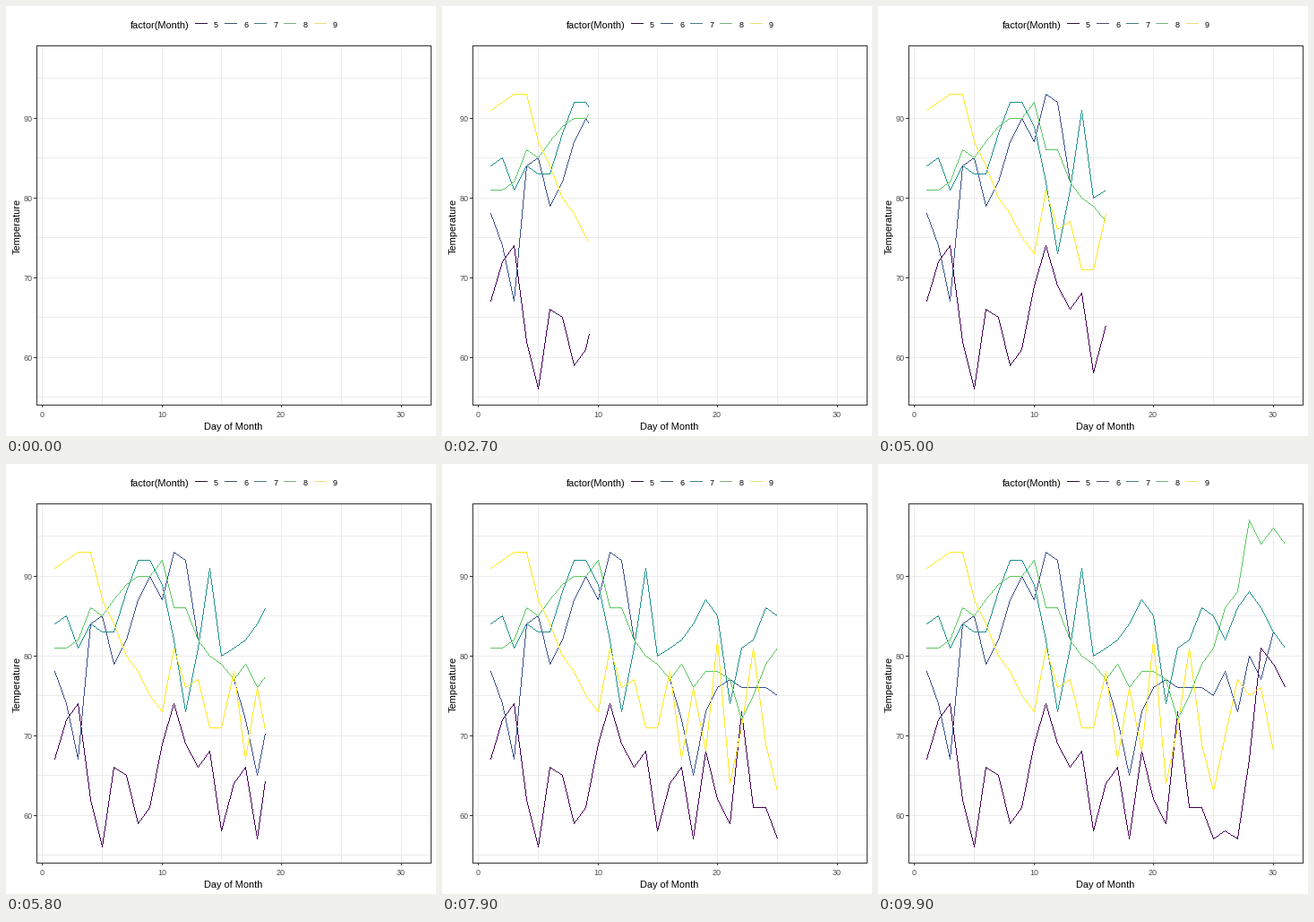
Write a matplotlib script that moves like this. It is 480x480 px and loops after 10 s.

```python
import numpy as np
import matplotlib.pyplot as plt
from matplotlib.animation import FuncAnimation
from matplotlib.colors import to_rgb

SIZE, FRAMES, INTERVAL = 480, 100, 100
LEFT, TOP, RIGHT, BOTTOM = 34, 44, 474, 445
plt.rcParams["font.family"] = "Liberation Sans"

MAY = [67, 72, 74, 62, 56, 66, 65, 59, 61, 69, 74, 69, 66, 68, 58, 64,
       66, 57, 68, 62, 59, 73, 61, 61, 57, 58, 57, 67, 81, 79, 76]
JUNE = [78, 74, 67, 84, 85, 79, 82, 87, 90, 87, 93, 92, 82, 80, 79,
        77, 72, 65, 73, 76, 77, 76, 76, 76, 75, 78, 73, 80, 77, 83]
JULY = [84, 85, 81, 84, 83, 83, 88, 92, 92, 89, 82, 73, 81, 91, 80, 81,
        82, 84, 87, 85, 74, 81, 82, 86, 85, 82, 86, 88, 86, 83, 81]
AUGUST = [81, 81, 82, 86, 85, 87, 89, 90, 90, 92, 86, 86, 82, 80, 79, 77,
          79, 76, 78, 78, 77, 72, 75, 79, 81, 86, 88, 97, 94, 96, 94]
SEPTEMBER = [91, 92, 93, 93, 87, 84, 80, 78, 75, 73, 81, 76, 77, 71, 71,
             78, 67, 76, 68, 82, 64, 71, 81, 69, 63, 70, 77, 75, 76, 68]
SERIES = [MAY, JUNE, JULY, AUGUST, SEPTEMBER]
COLORS = ["#440154", "#3B528B", "#21908C", "#5DC863", "#FDE725"]

DAYS = np.arange(1, 32)
# Each day is reached on a whole frame; the pen moves linearly in between.
ARRIVAL = np.round((DAYS - 1) * (FRAMES - 1) / 30)


def px(day):
    return 40.8 + 13.343 * day


def py(temp):
    return 125.1 + (90 - temp) * 8.9


def stroke(img, xs, ys, color):
    """One-pixel polyline without antialiasing; the final pixel stays open."""
    xs, ys = np.floor(xs).astype(int), np.floor(ys).astype(int)
    rgb = to_rgb(color)
    for x0, y0, x1, y1 in zip(xs, ys, xs[1:], ys[1:]):
        n = max(abs(x1 - x0), abs(y1 - y0))
        if n:
            t = np.arange(n) / n
            col = np.floor(x0 + (x1 - x0) * t + 0.5).astype(int)
            row = np.floor(y0 + (y1 - y0) * t + 0.5).astype(int)
            img[row, col] = rgb


def muted(color, amount=0.5):
    rgb = np.array(to_rgb(color))
    gray = rgb @ [0.299, 0.587, 0.114]
    return rgb + (gray - rgb) * amount


def make_background():
    img = np.ones((SIZE, SIZE, 3))
    for temp in range(55, 100, 5):
        img[int(py(temp)), LEFT:RIGHT] = to_rgb("#EBEBEB")
    for day in range(0, 35, 5):
        if day <= 30:
            img[TOP:BOTTOM, int(px(day))] = to_rgb("#EBEBEB")
    dark = to_rgb("#333333")
    img[[TOP, BOTTOM], LEFT:RIGHT + 1] = dark
    img[TOP:BOTTOM + 1, [LEFT, RIGHT]] = dark
    for temp in range(60, 100, 10):
        img[int(py(temp)), LEFT - 3:LEFT] = dark
    for day in range(0, 40, 10):
        img[BOTTOM:BOTTOM + 3, int(px(day))] = dark
    for i, color in enumerate(COLORS):
        x = int(211 + 33.3 * i)
        img[19, x:x + 14] = muted(color)
    return img


fig = plt.figure(figsize=(SIZE / 72, SIZE / 72), dpi=72, facecolor="white")
ax = fig.add_axes([0, 0, 1, 1])
background = make_background()
canvas = ax.imshow(background, extent=(0, SIZE, SIZE, 0),
                   interpolation="nearest", aspect="auto")
ax.set_axis_off()


def label(x, y, text, size=9, color="black", ha="center", **kw):
    ax.text(x, y, text, fontsize=size, color=color, ha=ha, va="baseline", **kw)


label(139, 25, "factor(Month)", 11, ha="left")
for i in range(5):
    label(234.5 + 33.2 * i, 24, str(5 + i))
for day in range(0, 40, 10):
    label(int(px(day)), 459, str(day), color="#4D4D4D")
for temp in range(60, 100, 10):
    label(29.5, int(py(temp)) + 4, str(temp), color="#4D4D4D", ha="right")
label(254, 473, "Day of Month", 11)
label(15.5, 246, "Temperature", 11, rotation=90, rotation_mode="anchor")


def draw(frame):
    img = background.copy()
    now = np.interp(frame, ARRIVAL, DAYS)
    for temps, color in zip(SERIES, COLORS):
        days = DAYS[:len(temps)]
        head = min(now, days[-1])
        past = days < head
        xs = np.append(days[past], head)
        ys = np.append(np.array(temps)[past], np.interp(head, days, temps))
        stroke(img, px(xs), py(ys), color)
    canvas.set_data(img)
    return [canvas]


anim = FuncAnimation(fig, draw, frames=FRAMES, interval=INTERVAL,
                     repeat=True, repeat_delay=0)
plt.show()
```
